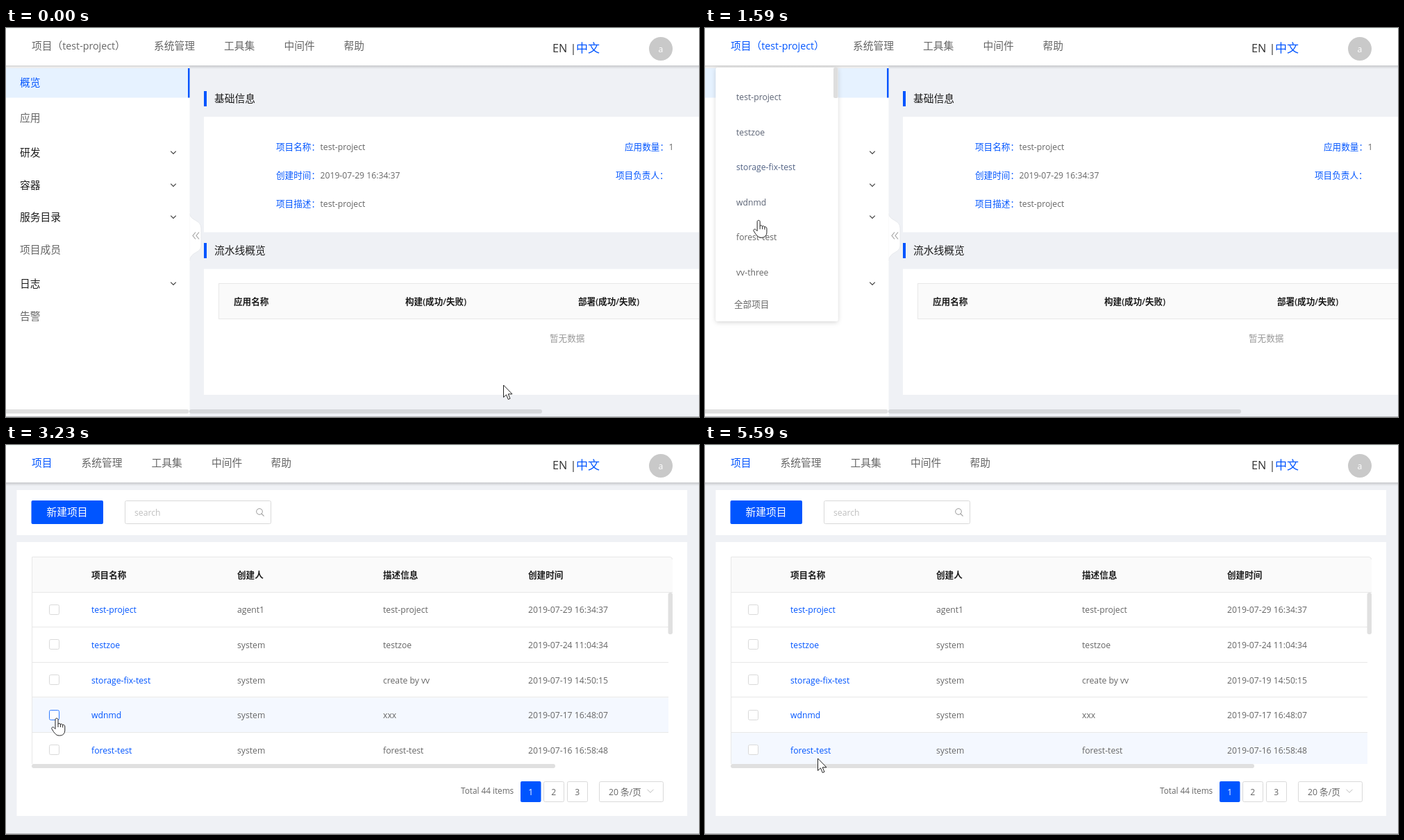
These frames come from a looping animation (998x561 px, 5810 ms). An HTML page:

```html
<!DOCTYPE html>
<html lang="zh-CN">
<head>
<meta charset="utf-8">
<title>Project console</title>
<style>
  html, body { margin: 0; width: 100%; height: 100%; overflow: hidden; background: #eff1f5; }
  svg { display: block; width: 100vw; height: 100vh; }
  text { font-family: "Open Sans", "Noto Sans CJK SC", "Noto Sans CJK", sans-serif; white-space: pre; }
</style>
</head>
<body>
<svg id="stage" viewBox="0 0 998 561" xmlns="http://www.w3.org/2000/svg"></svg>
<script>
const LOOP = 5810;
const BLUE = '#0055ff', GRAY = '#666', INK = '#1c1c1c', LINE = '#e8e8e8', EDGE = '#d9d9d9';
const S = 12.6, M = 14.75;

// ---- drawing helpers ----
const rect = (x, y, w, h, fill, extra = '') =>
  `<rect x="${x}" y="${y}" width="${w}" height="${h}" fill="${fill}" ${extra}/>`;
const frame = (x, y, w, h, extra = '') =>
  rect(x + .5, y + .5, w - 1, h - 1, '#fff', `stroke="${EDGE}" rx="2" ${extra}`);
const line = (d, color, width = 1) =>
  `<path d="${d}" fill="none" stroke="${color}" stroke-width="${width}"/>`;
const chevron = (x, y, w, color, width) =>
  line(`M${x - w / 2} ${y - w / 4}l${w / 2} ${w / 2}l${w / 2} ${-w / 2}`, color, width);
// y is the optical middle; Latin runs are set slightly smaller than Chinese ones
const text = (x, y, str, size = S, fill = GRAY, extra = 'font-weight="350"') => {
  const runs = str.replace(/[ -~]+/g, run =>
    `<tspan font-size="${(size * .968).toFixed(2)}" ${extra.includes('350') ? 'font-weight="400"' : ''}>${run}</tspan>`);
  return `<text x="${x}" y="${(y + size * .36).toFixed(2)}" font-size="${size}" fill="${fill}" ${extra}>${runs}</text>`;
};
const bold = (x, y, str) => text(x, y, str, S, INK, 'font-weight="600"');
const group = (id, body) => `<g id="${id}">${body}</g>`;

const nav = xs => ['系统管理', '工具集', '中间件', '帮助']
  .map((label, i) => text(xs[i], 26, label, M)).join('');

// ---- overview page ----
const sideItems = [['概览', 79, BLUE], ['应用', 130], ['研发', 180, INK], ['容器', 227, INK],
  ['服务目录', 273, INK], ['项目成员', 320], ['日志', 369, INK], ['告警', 416]];
const section = (y, label) => rect(285, y - 11, 4, 22, BLUE) + text(300, y, label, M, INK);
const field = (x, y, label, value = '') =>
  text(x, y, label + '：', S, BLUE) + text(x + label.length * S + S + .5, y, value);

const overview =
  rect(0, 54, 264.5, 506, '#fff') +
  rect(0, 58, 264, 42.5, '#e6f2ff') + rect(262, 58, 2.5, 42.5, BLUE) +
  sideItems.map(([label, y, color]) => text(20, y, label, M, color) +
    (color === INK ? chevron(241, y - .5, 7.5, '#444', 1.3) : '')).join('') +
  `<path d="M264 267C266 279 281 276 281 289V314C281 325 266 322 264 336Z" fill="#fff" stroke="#e4e6ea" stroke-width=".8"/>` +
  rect(262, 266, 2.5, 71, '#fff') +
  line('M273 294.5l-4 5l4 5M278 294.5l-4 5l4 5', '#a0a0a0', 1.1) +
  section(102, '基础信息') + rect(285, 128, 713, 166.5, '#fff') +
  field(389, 171, '项目名称', 'test-project') +
  field(389, 212, '创建时间', '2019-07-29 16:34:37') +
  field(389, 253.5, '项目描述', 'test-project') +
  field(891, 171, '应用数量', '1') + field(878, 212, '项目负责人') +
  section(321, '流水线概览') + rect(285, 347.5, 713, 181.5, '#fff') +
  rect(306.5, 368.5, 720, 51, '#fafafa', `stroke="${LINE}"`) +
  bold(328, 394.5, '应用名称') + bold(575, 394.5, '构建(成功/失败)') + bold(824, 394.5, '部署(成功/失败)') +
  text(783, 447, '暂无数据', S, '#999') +
  rect(-4, 550, 267.5, 6, '#e0e0e0', 'rx="3"') + rect(264, 550, 508, 6, '#d5d7da', 'rx="3"');

// ---- project list page ----
const rows = [
  ['test-project', 'agent1', 'test-project', '2019-07-29 16:34:37'],
  ['testzoe', 'system', 'testzoe', '2019-07-24 11:04:34'],
  ['storage-fix-test', 'system', 'create by vv', '2019-07-19 14:50:15'],
  ['wdnmd', 'system', 'xxx', '2019-07-17 16:48:07'],
  ['forest-test', 'system', 'forest-test', '2019-07-16 16:58:48']];
const cols = [123, 333, 543, 752];
const ROW_TOP = 212.5, ROW_H = 50.65;
const rowMid = i => ROW_TOP + ROW_H * (i + .5);
const linkEnd = [188, 163, 209, 165, 181];

const tableRows = rows.map((cells, i) => {
  const y = rowMid(i), top = ROW_TOP + ROW_H * i;
  return rect(38, top, 916, Math.min(ROW_H, 460 - top), '#f4f8ff', 'class="row"') +
    (i ? line(`M37 ${Math.round(top) - .5}H954`, LINE) : '') +
    frame(62, Math.round(y) - 8, 15, 15, 'class="check"') +
    cells.map((cell, c) => text(cols[c], y, cell, S, c ? GRAY : BLUE)).join('');
}).join('');

const pageBox = (x, n) => frame(x, 485, 30, 30) + text(x + 11.2, 500, n);
const projects =
  rect(15.5, 65, 965.5, 65, '#fff') + rect(15.5, 140, 965.5, 395, '#fff') +
  rect(36.5, 80, 103.5, 34, BLUE, 'rx="2"') + text(58.5, 97, '新建项目', M, '#fff') +
  frame(171, 80, 211, 34) + text(185, 97.5, 'search', S, '#bfbfbf') +
  `<circle cx="365" cy="96" r="4.3" fill="none" stroke="#999"/>` + line('M368 99.2l3.6 3.4', '#999', 1.1) +
  `<path d="M37.5 212V161.5H956Q960 161.5 960 165.5V212Z" fill="#fafafa"/>` +
  line('M37.5 460V161.5H956Q959.5 161.5 959.5 165', LINE) + line('M37 212.5H960', LINE) +
  ['项目名称', '创建人', '描述信息', '创建时间'].map((h, i) => bold(cols[i], 187, h)).join('') +
  group('rows', tableRows +
    rect(953.5, 213, 6.5, 60, '#e0e0e0', 'rx="3"') + rect(37, 460, 754, 6, '#e0e0e0', 'rx="3"') +
    text(655, 499, 'Total 44 items', 12.15) +
    rect(741, 485, 29.5, 30, BLUE, 'rx="2"') + text(752.2, 500, '1', S, '#fff') +
    pageBox(774, '2') + pageBox(808, '3') +
    frame(854, 485, 93, 30) + text(868, 500.5, '20 条/页') + chevron(928, 499, 9, '#bbb', 1));

// ---- header, menu, pointer ----
const header =
  rect(0, 54, 998, 5, 'url(#shade)') + rect(0, 0, 998, 54, '#fff') + rect(0, 0, 998, 1, '#effcf8') +
  group('navLong', text(37, 26, '项目（test-project）', M, GRAY, 'font-weight="350" id="current"') +
    nav([213, 314, 400.5, 486.5])) +
  group('navShort', text(37, 26, '项目', M, BLUE) + nav([108.5, 209.5, 296, 381.5])) +
  rect(15, 50, 177, 2.2, BLUE, 'id="underline"') +
  text(787, 28.5, 'EN |', 16.8, '#333') + text(821, 28.5, '中文', 17, BLUE) +
  `<circle cx="943" cy="30" r="17" fill="#c9c9c9"/>` +
  text(943, 30.5, 'a', S, '#fff', 'font-weight="400" text-anchor="middle"');

const MENU = ['test-project', 'testzoe', 'storage-fix-test', 'wdnmd', 'forest-test', 'vv-three'];
const itemY = i => i < 6 ? 99.5 + 50.5 * i : 398;
const menu =
  rect(15.5, 57, 176, 366, '#fff', 'rx="3" filter="url(#soft)"') +
  rect(185, 57, 6.5, 44, '#dedede', 'rx="2"') +
  [...MENU, '全部项目'].map((label, i) =>
    text(i < 6 ? 45 : 42, itemY(i), label, S, GRAY, 'font-weight="350" class="item"')).join('');

const pointer =
  `<g id="pointer" stroke="#222" stroke-linejoin="round" fill="#fff">` +
  `<path id="arrow" d="M.5 0V17.6L4.5 13.9L7.3 20.6L10 19.4L7.2 12.9H13Z"/>` +
  `<path id="hand" d="M-2 2C-2-.5 2-.5 2 2V8.5C2.2 7 5.2 7.2 5.4 9C5.6 7.8 8.6 8.2 8.7 10C9 9 11.8 9.4 11.8 12` +
  `V17C11.8 22 9 25 4.5 25H3C-.5 25-2 22.5-4.5 19.5L-7 15.5C-8 13.5-5.5 12-4 13.5L-2 15.5Z` +
  `M2 8.5V13M5.4 9V13M8.7 10V13.5"/></g>`;

const $ = id => document.getElementById(id);
$('stage').innerHTML =
  `<defs><linearGradient id="shade" x2="0" y2="1"><stop stop-opacity=".17"/><stop offset="1" stop-opacity="0"/></linearGradient>` +
  `<filter id="soft" x="-10%" y="-10%" width="120%" height="120%"><feDropShadow dx="0" dy="1.5" stdDeviation="3" flood-opacity=".17"/></filter></defs>` +
  rect(0, 0, 998, 561, '#eff1f5') +
  group('overview', overview) + group('projects', projects) + header + group('menu', menu) +
  `<circle id="click" cx="74.3" cy="395.3" r="14.3" fill="#ffff00"/>` +
  rect(0, 560, 998, 1, '#b4b6b9') + pointer;

const all = name => [...document.querySelectorAll('.' + name)];
const items = all('item'), hovers = all('row'), checks = all('check');

// ---- timing ----
// bursts of screen updates: first, last, count
const bursts = [[50, 610, 8], [670, 990, 5], [1150, 1680, 8], [1750, 2300, 8], [2450, 2540, 2],
  [2690, 3230, 8], [3380, 3940, 8], [4020, 4570, 8], [4640, 5170, 8], [5260, 5590, 5]];
const ticks = bursts.flatMap(([a, b, n]) =>
  Array.from({ length: n }, (_, i) => Math.round(a + (b - a) * i / (n - 1))));
const snap = t => ticks.reduce((last, k) => k <= t ? k : last, 0);

// pointer path: time, x, y
const path = [[0, 716, 515], [50, 712, 508], [130, 660, 455], [290, 430, 250], [450, 215, 110],
  [530, 158, 70], [610, 131, 38], [750, 127, 27], [900, 127, 25], [990, 127, 25], [1150, 127, 31],
  [1230, 122, 62], [1380, 104, 165], [1530, 77, 278], [1590, 72, 302], [1680, 72, 319],
  [1750, 73, 329], [2000, 74, 372], [2300, 74, 395], [2690, 74, 395], [3230, 73, 394], [3304, 73, 394],
  [3380, 75, 386], [3540, 108, 290], [3620, 150, 225], [3700, 240, 180], [3860, 640, 166],
  [3940, 816, 176], [4020, 851, 192], [4100, 690, 215], [4180, 390, 230], [4270, 157, 238],
  [4350, 136, 248], [4460, 260, 275], [4570, 560, 298], [4700, 800, 322], [4790, 845, 345],
  [4900, 700, 380], [5040, 330, 407], [5170, 158, 426], [5260, 157, 434], [5590, 162, 452], [LOOP, 162, 452]];
const pos = t => {
  const i = Math.max(1, path.findIndex(p => p[0] >= t));
  const [t0, x0, y0] = path[i - 1], [t1, x1, y1] = path[i];
  const k = Math.max(0, (t - t0) / (t1 - t0));
  return [x0 + (x1 - x0) * k, y0 + (y1 - y0) * k];
};

const ramp = (t, a, b) => Math.min(1, Math.max(0, (t - a) / (b - a)));
const easeOut = k => 1 - (1 - k) ** 3;
const mix = k => `rgb(${[[102, 0], [102, 85], [102, 255]].map(([a, b]) => Math.round(a + (b - a) * k))})`;
const show = (id, on) => $(id).style.display = on ? '' : 'none';

const SWITCH = 2767, LOADED = 2921;
// share of the last 300 ms spent inside, which acts as a hover transition
const hoverShare = (t, inside, from) => {
  let n = 0;
  for (let k = 0; k < 10; k++) {
    const at = t - k * 30;
    if (at >= from && inside(...pos(at))) n++;
  }
  return n / 10;
};
const inRow = i => (x, y) => x > 37 && x < 954 && Math.floor((y - ROW_TOP) / ROW_H) === i && y < 460;
const onCheck = (x, y, i) => x > 61 && x < 78 && Math.abs(y - rowMid(i)) < 9;
const onLink = (x, y, i) => x > 122 && x < linkEnd[i] && Math.abs(y - rowMid(i)) < 9;

function draw(now) {
  const t = snap(now), [x, y] = pos(t), list = t >= SWITCH;
  show('overview', !list);
  show('navLong', !list);
  show('projects', list);
  show('navShort', list);
  show('rows', t >= LOADED);
  show('underline', !list && y < 54);
  $('current').setAttribute('fill', mix(ramp(t, 590, 830)));

  const opacity = ramp(t, 590, 800) * (1 - ramp(t, 2660, 2844));
  show('menu', opacity > 0);
  $('menu').setAttribute('opacity', opacity);
  const scale = .8 + .2 * easeOut(ramp(t, 590, 960));
  $('menu').setAttribute('transform', `translate(0 57) scale(1 ${scale}) translate(0 -57)`);
  items.forEach((el, i) => el.setAttribute('fill',
    mix(hoverShare(t, (px, py) => px < 185 && Math.abs(py - itemY(i)) < 14, 1150))));

  show('click', t >= 2450 && t < 2690);
  $('click').setAttribute('opacity', t < 2540 ? .5 : .62);

  hovers.forEach((el, i) => el.setAttribute('opacity', hoverShare(t, inRow(i), LOADED)));
  checks.forEach((el, i) => el.setAttribute('stroke', t >= LOADED && onCheck(x, y, i) ? '#2f7bff' : EDGE));

  const hand = t < LOADED ? x < 192 && (y < 54 || t > 610)
    : rows.some((_, i) => onCheck(x, y, i) || onLink(x, y, i));
  show('hand', hand);
  show('arrow', !hand);
  $('pointer').setAttribute('transform', `translate(${x} ${y})`);
}

const start = performance.now();
function tick() {
  draw((performance.now() - start) % LOOP);
  requestAnimationFrame(tick);
}
tick();
</script>
</body>
</html>
```
